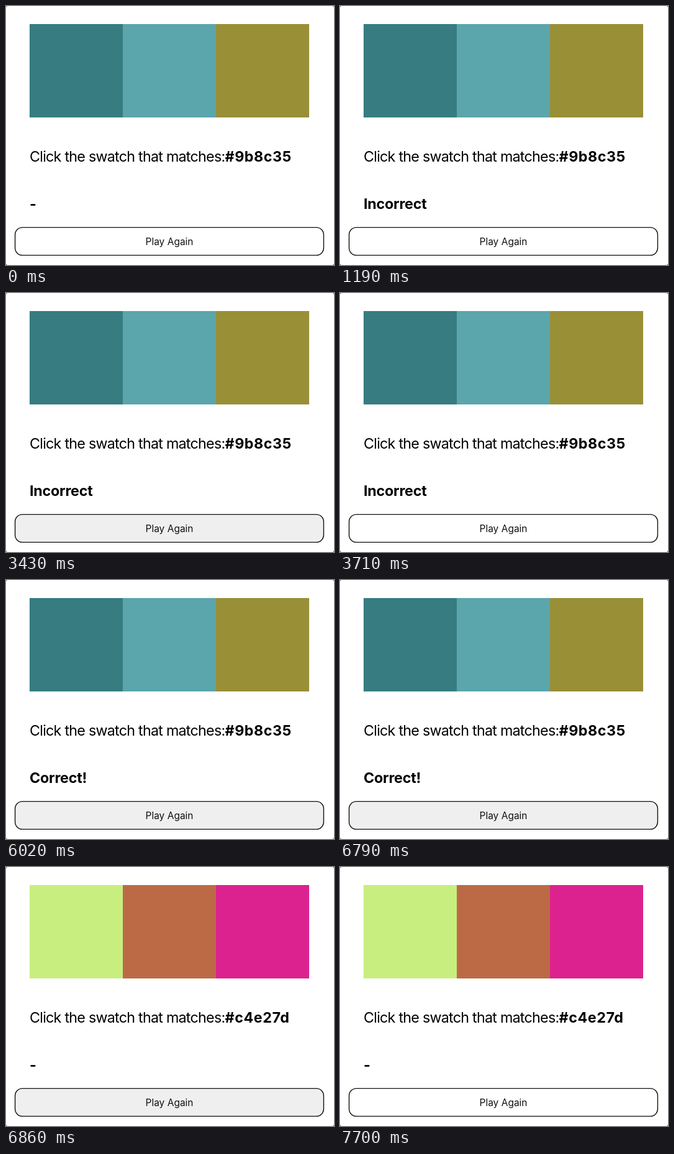
An HTML page that plays this animation: 528 by 416 pixels, repeating every 8000 ms.

```html
<!DOCTYPE html>
<html lang="en">
<head>
<meta charset="utf-8">
<title>Swatch game</title>
<style>
  html, body { margin: 0; width: 100%; height: 100%; overflow: hidden; background: #fff; }
  svg { display: block; font-family: Inter, "Liberation Sans", sans-serif; font-optical-sizing: none; }
  .big { font-size: 23.3px; }
  .bold { font-weight: 700; }
</style>
</head>
<body>
<svg width="528" height="416" viewBox="0 0 528 416">
  <path d="M0 0h2L0 2zM528 0v2l-2-2zM0 416v-2l2 2zM528 416h-2l2-2z" fill="#777"/>
  <g id="swatches">
    <rect x="38" y="29" width="150" height="150"/>
    <rect x="188" y="29" width="150" height="150"/>
    <rect x="338" y="29" width="150" height="150"/>
  </g>
  <text class="big" x="38" y="250" letter-spacing="-.76">Click the swatch that matches:</text>
  <text class="big bold" id="code" x="352.5" y="250" letter-spacing=".55"></text>
  <text class="big bold" id="result" x="38" y="326" letter-spacing="-.25"></text>
  <rect id="button" x="14.6" y="355.6" width="496.8" height="44.8" rx="12" stroke="#111" stroke-width="1.4"/>
  <text x="263" y="384.4" font-size="15.5" text-anchor="middle" fill="#111">Play Again</text>
</svg>
<script>
  const LOOP = 8000;
  const el = id => document.getElementById(id);
  const rounds = [
    { code: "#9b8c35", colors: ["#367c81", "#5aa6ac", "#998f37"] },
    { code: "#c4e27d", colors: ["#c8ee80", "#bc6a46", "#dc228e"] }
  ];
  const hovers = [[3430, 3710], [4830, 5040], [6020, 7700]];
  const results = [[0, "-"], [1190, "Incorrect"], [4550, "Correct!"], [6860, "-"]];
  const swatches = [...el("swatches").children];

  function draw(now) {
    const t = now % LOOP;
    const round = rounds[t < 6860 ? 0 : 1];
    swatches.forEach((s, i) => s.setAttribute("fill", round.colors[i]));
    el("code").textContent = round.code;
    el("result").textContent = results.filter(([start]) => t >= start).pop()[1];
    const hover = hovers.some(([from, to]) => t >= from && t < to);
    el("button").setAttribute("fill", hover ? "#efefef" : "#fff");
  }

  const start = performance.now();
  function tick() {
    draw(performance.now() - start);
    requestAnimationFrame(tick);
  }
  tick();
</script>
</body>
</html>
```
